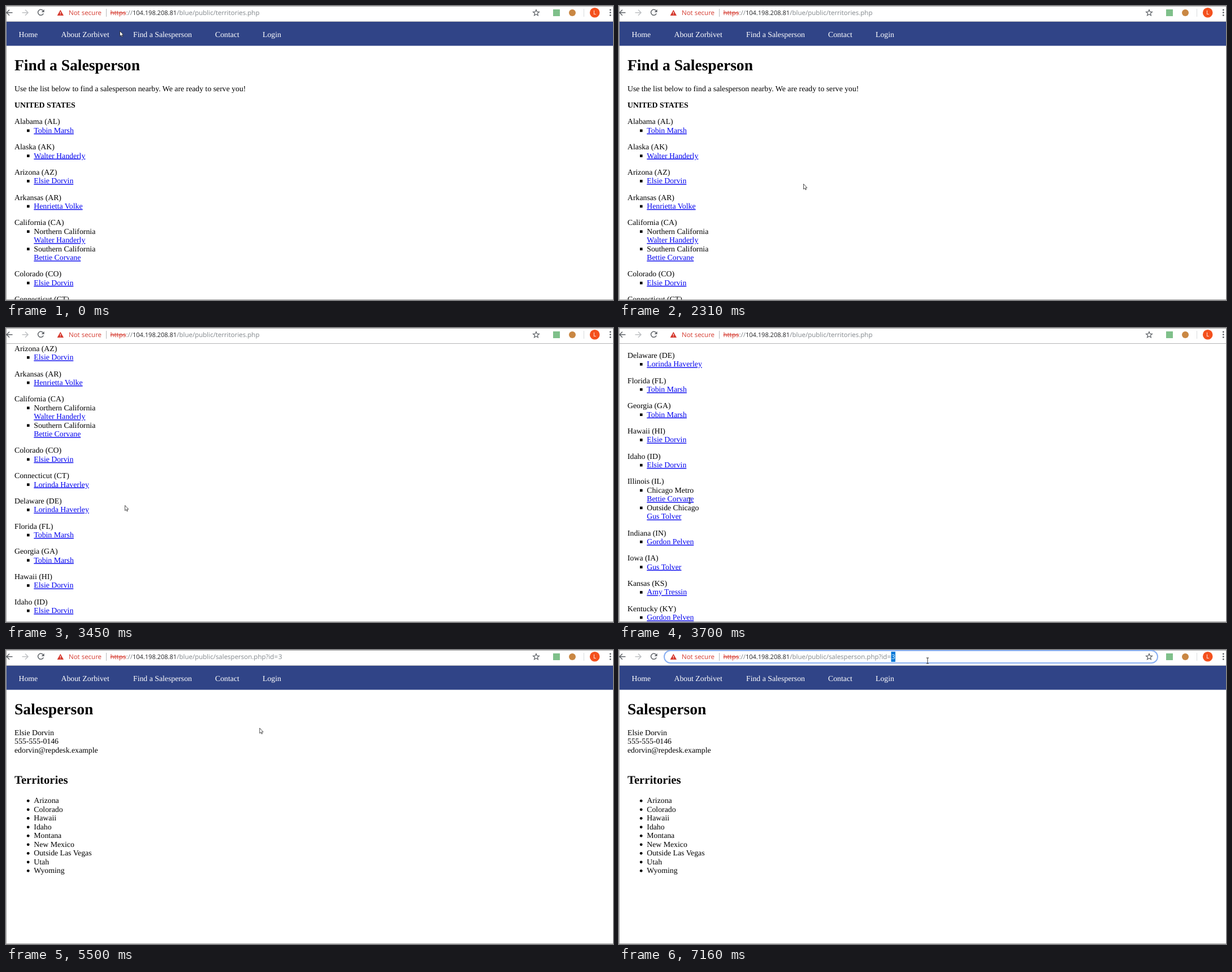
An HTML page for the animation above (8000 ms loop, 1074 by 521 pixels).

```html
<!DOCTYPE html>
<html lang="en">
<head>
<meta charset="utf-8">
<title>Find a Salesperson</title>
<style>
html, body { margin: 0; width: 100%; height: 100%; overflow: hidden; background: #fff; }
svg { display: block; width: 100%; height: 100%; }
text { white-space: pre; text-rendering: geometricPrecision; }
.page { font: 13.78px "Liberation Serif", "Times New Roman", serif; }
.page a, .link { fill: #00e; text-decoration: underline; }
.b { font-weight: bold; }
h1, .h1 { font-size: 27.55px; font-weight: bold; }
.h2 { font-size: 20.67px; font-weight: bold; }
.nav { fill: #fff; }
.bar { font: 11.5px "Open Sans", "Noto Sans", sans-serif; fill: #80868b; }
.host { font-size: 11px; fill: #202124; }
.red { fill: #d5392e; }
.line { fill: none; stroke: #5f6368; stroke-width: 1.5; }

/* Every track shares one 8 s clock; percent = ms / 80. */
.track { animation: 8s step-end infinite; }
#scroll { animation-name: scroll; }
#cursor { animation-name: cursor; }
.first { animation-name: first; }
.second { animation-name: second; }
.idle { animation-name: idle; }
.busy { animation-name: busy; }
.hover { animation-name: hover; }
.focus { animation-name: focus; }
.select { animation-name: select; }
.arrow { animation-name: arrow; }
.beam { animation-name: beam; }
.hand { animation-name: hand; }

@keyframes scroll {
  0% { transform: translateY(0); }
  37.375% { transform: translateY(-20px); }
  39% { transform: translateY(-93px); }
  40.875% { transform: translateY(-172px); }
  43.125% { transform: translateY(-258px); }
  44.75% { transform: translateY(-400px); }
  46.25%, 100% { transform: translateY(-516px); }
}
@keyframes cursor {
  0% { transform: translate(201px, 44px); }
  1.5% { transform: translate(201px, 44px); animation-timing-function: steps(3, start); }
  7.62% { transform: translate(286px, 68px); }
  7.625% { transform: translate(279px, 59px); }
  11.125% { transform: translate(280px, 59px); }
  14.5% { transform: translate(280px, 59px); animation-timing-function: steps(4, start); }
  21.8% { transform: translate(419px, 190px); animation-timing-function: steps(4, start); }
  28.87% { transform: translate(345px, 296px); }
  28.875% { transform: translate(326px, 315px); }
  30.75% { transform: translate(326px, 315px); animation-timing-function: steps(5, start); }
  39% { transform: translate(250.5px, 317px); }
  43.125% { transform: translate(210px, 314px); }
  44.75% { transform: translate(165px, 309px); }
  46.25% { transform: translate(125px, 306px); }
  47.875% { transform: translate(118px, 285px); }
  49.5% { transform: translate(112px, 262px); }
  51.125% { transform: translate(106px, 243px); }
  54.875% { transform: translate(230px, 268px); }
  56.3% { transform: translate(366px, 282px); }
  62% { transform: translate(366px, 282px); animation-timing-function: steps(7, start); }
  74.45% { transform: translate(510px, 30px); }
  74.5% { transform: translate(525px, 9px); }
  76.25% { transform: translate(499.5px, 15.5px); }
  79.625% { transform: translate(484px, 15px); }
  82.125% { transform: translate(492px, 16px); }
  84.625% { transform: translate(512px, 17px); }
  87% { transform: translate(532px, 18px); }
  89.5%, 100% { transform: translate(546px, 19px); }
}
@keyframes first { 0% { visibility: visible; } 54.875%, 100% { visibility: hidden; } }
@keyframes second { 0% { visibility: hidden; } 54.875%, 100% { visibility: visible; } }
@keyframes idle {
  0%, 18%, 56.3%, 100% { visibility: visible; }
  14.5%, 54.875% { visibility: hidden; }
}
@keyframes busy {
  0%, 18%, 56.3%, 100% { visibility: hidden; }
  14.5%, 54.875% { visibility: visible; }
}
@keyframes hover {
  0%, 79.625%, 100% { visibility: hidden; }
  74.5% { visibility: visible; }
}
@keyframes focus { 0% { visibility: hidden; } 79.625%, 100% { visibility: visible; } }
@keyframes select { 0% { visibility: hidden; } 82.125%, 100% { visibility: visible; } }
@keyframes arrow {
  0%, 54.875% { visibility: visible; }
  46.25%, 74.5%, 100% { visibility: hidden; }
}
@keyframes beam {
  0%, 51.125% { visibility: hidden; }
  46.25%, 74.5%, 100% { visibility: visible; }
}
@keyframes hand {
  0%, 54.875%, 100% { visibility: hidden; }
  51.125% { visibility: visible; }
}
</style>
</head>
<body>
<svg viewBox="0 0 1074 521">
  <defs>
    <g id="nav" class="nav">
      <rect x="0" y="27" width="1074" height="43.5" fill="#304487"/>
      <text x="22.5" y="54.6">Home</text>
      <text x="97.5" y="54.6">About Zorbivet</text>
      <text x="225" y="54.6">Find a Salesperson</text>
      <text x="370" y="54.6">Contact</text>
      <text x="454" y="54.6">Login</text>
    </g>
  </defs>
  <rect width="1074" height="521" fill="#fff"/>

  <g class="page track first">
    <g id="scroll" class="track">
      <use href="#nav"/>
      <text class="h1" x="15" y="114">Find a Salesperson</text>
      <text x="15" y="150.8">Use the list below to find a salesperson nearby. We are ready to serve you!</text>
      <text class="b" x="15" y="180">UNITED STATES</text>
      <g id="states"></g>
    </g>
  </g>

  <g class="page track second">
    <use href="#nav"/>
    <text class="h1" x="15" y="114">Salesperson</text>
    <text x="15" y="150.8">Elsie Dorvin</text>
    <text x="15" y="166.3">555-555-0146</text>
    <text x="15" y="181.8">edorvin@repdesk.example</text>
    <text class="h2" x="15" y="237">Territories</text>
    <g id="areas"></g>
  </g>

  <!-- Browser toolbar -->
  <rect width="1074" height="27" fill="#fff"/>
  <path d="M0 27.5H1074" stroke="#b4b4b6"/>
  <path d="M.5 521V.5H1074M0 520.5H1074" fill="none" stroke="#a0a0a0"/>
  <rect class="track hover" x="80" y="1" width="873" height="22" rx="11" fill="#ebecee"/>
  <rect class="track focus" x="80" y="1" width="873" height="22" rx="11" fill="#fff" stroke="#8ab0f2" stroke-width="2"/>
  <path class="line" d="M11.5 11.7H1.5M6 6.7L1 11.7L6 16.7"/>
  <path class="line" style="stroke:#bfc1c4" d="M28.5 11.7H38.5M34 6.7L39 11.7L34 16.7"/>
  <g class="track idle">
    <path class="line" d="M65.6 8.4A5 5 0 1 0 66.2 13.2"/>
    <path d="M67.6 6V11H62.6Z" fill="#5f6368"/>
  </g>
  <path class="line track busy" d="M57 7.2L66 16.2M66 7.2L57 16.2"/>
  <path d="M96.3 6.8L102 17H90.6Z" fill="#d5392e"/>
  <path d="M96.3 10.2V13.4M96.3 14.4V15.6" stroke="#fff" stroke-width="1.1"/>
  <path d="M177.5 5V19" stroke="#b5b8bb"/>
  <path d="M1022.5 5V19" stroke="#d9dbde"/>
  <g class="bar">
    <text class="red" x="111" y="16">Not secure</text>
    <text class="red" x="184.5" y="16" text-decoration="line-through">https</text>
    <text x="212.5" y="16">://</text>
    <text class="host" x="224" y="16">104.198.208.81</text>
    <text class="track first" x="302.3" y="16">/blue/public/territories.php</text>
    <g class="track second">
      <text x="302.3" y="16">/blue/public/salesperson.php?id=</text>
      <text x="482" y="16">3</text>
    </g>
    <g class="track select">
      <rect x="481.5" y="3" width="7.5" height="18" fill="#0078d7"/>
      <text x="482" y="16" fill="#fff">3</text>
    </g>
  </g>
  <path class="line" style="stroke-width:1.2" d="M938 6.6L939.5 10.2L943.4 10.5L940.4 13L941.4 16.8L938 14.8L934.6 16.8L935.6 13L932.6 10.5L936.5 10.2Z"/>
  <rect x="968" y="6" width="12" height="12" fill="#7fc08a"/>
  <circle cx="1002" cy="12" r="6" fill="#c98743"/>
  <circle cx="1041.7" cy="11.7" r="8.8" fill="#f4511e"/>
  <text class="bar" style="fill:#fff;font-size:10px" x="1041.7" y="15.3" text-anchor="middle">L</text>
  <g fill="#5f6368">
    <circle cx="1069.3" cy="7" r="1.4"/><circle cx="1069.3" cy="11.7" r="1.4"/><circle cx="1069.3" cy="16.4" r="1.4"/>
  </g>

  <g id="cursor" class="track">
    <path class="track arrow" d="M.5 .4V9.6L2.6 7.8L4 10.8L5.4 10.2L4 7.2H6.8Z" fill="#fff" stroke="#222" stroke-width=".8"/>
    <path class="track beam" d="M-2.2 -5H2.2M0 -5V5M-2.2 5H2.2" fill="none" stroke="#333" stroke-width="1"/>
    <path class="track hand" d="M-1 0Q0 -1 1 0V4.5L5.5 5.5Q7 6 6.5 8L5.5 12.5H-.5L-4 7.5Q-3.5 6 -1 8Z" fill="#fff" stroke="#222" stroke-width=".8"/>
  </g>
</svg>
<script>
const LINE = 15.5, GAP = 29.2;
const NS = "http://www.w3.org/2000/svg";

function add(parent, tag, attrs, label = "") {
  const el = document.createElementNS(NS, tag);
  for (const key in attrs) el.setAttribute(key, attrs[key]);
  el.textContent = label;
  parent.append(el);
}

const people = {
  T: "Tobin Marsh", W: "Walter Handerly", E: "Elsie Dorvin", H: "Henrietta Volke",
  B: "Bettie Corvane", L: "Lorinda Haverley", G: "Gus Tolver", P: "Gordon Pelven", A: "Amy Tressin"
};

// State name, then one "key" or "key:area" per entry.
const states = [
  ["Alabama (AL)", "T"], ["Alaska (AK)", "W"], ["Arizona (AZ)", "E"], ["Arkansas (AR)", "H"],
  ["California (CA)", "W:Northern California", "B:Southern California"],
  ["Colorado (CO)", "E"], ["Connecticut (CT)", "L"], ["Delaware (DE)", "L"],
  ["Florida (FL)", "T"], ["Georgia (GA)", "T"], ["Hawaii (HI)", "E"], ["Idaho (ID)", "E"],
  ["Illinois (IL)", "B:Chicago Metro", "G:Outside Chicago"],
  ["Indiana (IN)", "P"], ["Iowa (IA)", "G"], ["Kansas (KS)", "A"], ["Kentucky (KY)", "P"]
];

const list = document.getElementById("states");
let y = 209.4;
for (const [state, ...entries] of states) {
  add(list, "text", { x: 15, y }, state);
  for (const entry of entries) {
    const [key, area] = entry.split(":");
    y += LINE;
    add(list, "rect", { x: 37, y: y - 6.3, width: 4.6, height: 4.6 });
    if (area) {
      add(list, "text", { x: 49.3, y }, area);
      y += LINE;
    }
    add(list, "text", { x: 49.3, y, class: "link" }, people[key]);
  }
  y += GAP;
}

const areas = document.getElementById("areas");
["Arizona", "Colorado", "Hawaii", "Idaho", "Montana", "New Mexico", "Outside Las Vegas", "Utah", "Wyoming"]
  .forEach((area, i) => {
    const base = 271.3 + i * LINE;
    add(areas, "circle", { cx: 39.2, cy: base - 4, r: 2.4 });
    add(areas, "text", { x: 49.3, y: base }, area);
  });
</script>
</body>
</html>
```
